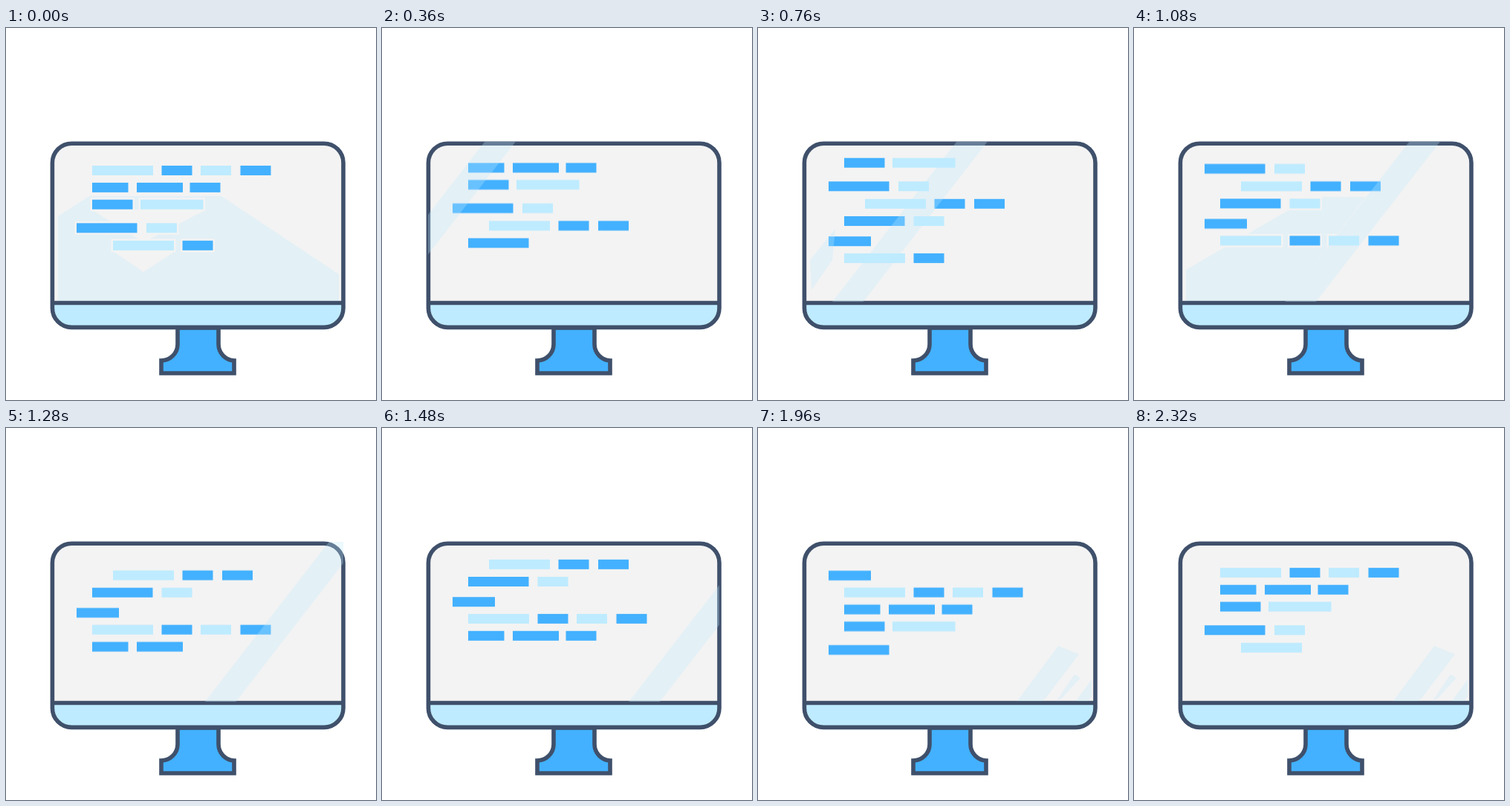
Recreate the animation shown at these times as an HTML page. Size 498 by 500 pixels, loop 2.36 s.

```html
<!DOCTYPE html>
<html lang="en">
<head>
<meta charset="utf-8">
<title>Code on a monitor</title>
<style>
  html, body { margin: 0; width: 100%; height: 100%; overflow: hidden; background: #fff; }
  svg { display: block; width: 498px; height: 500px; }
  .edge { stroke: #3f506b; stroke-width: 5.6; }
  .dark { fill: #43b1ff; }
  .light { fill: #beebff; }
  .paper { fill: #f3f3f3; }
  .wash { fill: #e3f0f6; }
  #lines rect { stroke: #f3f3f3; stroke-width: 5; paint-order: stroke; opacity: 0; }

  #lines { animation: scroll 2360ms steps(59) infinite; }
  #shine { animation: sweep 2360ms steps(59) infinite; }
  #wash1, #wash2, #glint1, #glint2 { animation: 2360ms step-end infinite; opacity: 0; }
  #wash1 { animation-name: wash1; }
  #wash2 { animation-name: wash2; }
  #glint1 { animation-name: glint1; }
  #glint2 { animation-name: glint2; }

  @keyframes scroll { to { transform: translateY(-173.9px); } }
  @keyframes sweep { from { transform: translateX(22px); } to { transform: translateX(783px); } }
  @keyframes wash1 { 0% { opacity: 1; } 1.69% { opacity: 0; } }
  @keyframes wash2 { 0% { opacity: 0; } 45.76% { opacity: 1; } 47.45% { opacity: 0; } }
  @keyframes glint1 { 0% { opacity: 0; } 20.33% { opacity: 1; } 45.76% { opacity: 0; } }
  @keyframes glint2 { 0% { opacity: 0; } 67.79%, 100% { opacity: 1; } }
</style>
</head>
<body>
<svg viewBox="0 0 498 500">
  <defs>
    <clipPath id="body"><rect x="62.4" y="155.2" width="391.6" height="247.2" rx="26"/></clipPath>
    <clipPath id="glass"><rect x="62" y="153" width="392" height="214.5"/></clipPath>
  </defs>

  <path class="dark edge" d="M231 403V425A22 22 0 0 1 209 447V464H307V447A22 22 0 0 1 286 425V403Z"/>
  <g clip-path="url(#body)">
    <rect class="paper" x="60" y="152" width="398" height="218"/>
    <rect class="light" x="60" y="369" width="398" height="36"/>
  </g>

  <g id="wash1">
    <path class="wash" d="M70 253L112 226H290L448 331V367H70Z"/>
    <path class="paper" d="M115 244L185 288L270 244ZM144 300L185 328L228 300Z"/>
  </g>
  <path id="wash2" class="wash" d="M70 325L213 242H253V227H312L204 367H70Z"/>

  <g id="lines"></g>

  <path class="edge" d="M62 369.5H454"/>
  <rect class="edge" x="62.4" y="155.2" width="391.6" height="247.2" rx="26" fill="none"/>

  <g clip-path="url(#glass)" opacity=".3">
    <path id="glint1" class="light" d="M72 352L70 312L104 270L100 312Z"/>
    <path id="glint2" class="light" d="M349 367L404 293L432 304L388 362L382 367ZM402 367L426 331L434 336L410 362ZM428 367L449 338V361L444 367Z"/>
    <path id="shine" class="light" d="M0 153H41.5L-125.5 368H-167Z"/>
  </g>
</svg>
<script>
  const LOOP = 2360, RISE = 173.9, TOP = 173, FRAME = 40;

  // Each line: resting y, then blocks as [x, width, shade, time it is typed]
  const lines = [
    [185, [116, 82, 'light', 560], [209.5, 41, 'dark', 680], [262, 41, 'light', 840], [315.5, 41, 'dark', 960]],
    [207.9, [116, 48.5, 'dark', 1120], [176, 62, 'dark', 1240], [247.5, 41, 'dark', 1360]],
    [230.7, [116, 54.5, 'dark', 1560], [181, 84.5, 'light', 1720]],
    [262.3, [95, 81.5, 'dark', 1920], [189, 41, 'light', 2080]],
    [285.8, [144, 82, 'light', 2200], [237.5, 41, 'dark', 2360], [291, 41, 'dark', 2560]],
    [309, [116, 81.5, 'dark', 2680], [209.5, 41, 'light', 2760]],
    [336.2, [95, 57, 'dark', 2840]]
  ];

  const group = document.getElementById('lines');
  const pct = t => (t / LOOP * 100).toFixed(3) + '%';
  let css = '', count = 0;

  function addBlock(x, y, width, shade, on, off) {
    if (off <= 0 || on >= LOOP) return;
    const name = 'block' + count++;
    const rect = document.createElementNS('http://www.w3.org/2000/svg', 'rect');
    for (const [key, value] of Object.entries({ x, y, width, height: 13, class: shade }))
      rect.setAttribute(key, value);
    rect.style.animation = `${name} ${LOOP}ms step-end infinite`;
    group.append(rect);

    let steps = on > 0 ? `0%{opacity:0}${pct(on)}{opacity:1}` : '0%{opacity:1}';
    steps += off < LOOP ? `${pct(off)}{opacity:0}` : '100%{opacity:1}';
    css += `@keyframes ${name}{${steps}}`;
  }

  // Two stacked copies of the code make the scroll seamless
  for (const copy of [0, 1]) {
    for (const [y, ...blocks] of lines) {
      const top = y + copy * RISE;
      const off = Math.ceil((top - TOP) / RISE * LOOP / FRAME) * FRAME;
      for (const [x, width, shade, typed] of blocks)
        addBlock(x, top, width, shade, typed + (copy - 1) * LOOP, off);
    }
  }

  const style = document.createElement('style');
  style.textContent = css;
  document.head.append(style);
</script>
</body>
</html>
```
